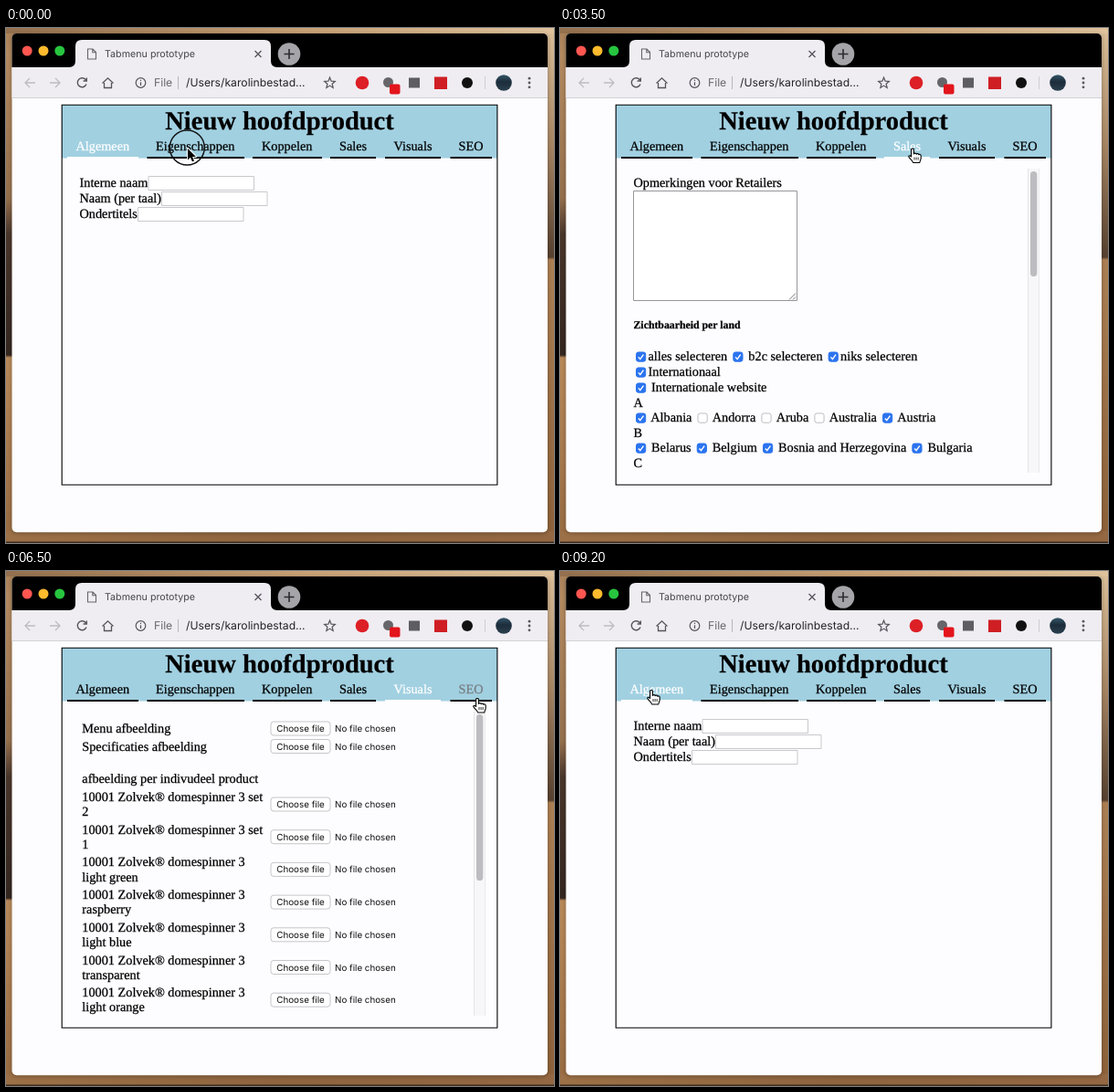
An HTML page with a canvas that plays this animation: 600 px wide and 564 px high, repeating every 9300 ms.

```html
<!DOCTYPE html>
<html lang="nl">
<head>
<meta charset="utf-8">
<title>Tabmenu prototype</title>
<style>
html, body { margin: 0; width: 100%; height: 100%; overflow: hidden; }
canvas { display: block; }
</style>
</head>
<body>
<canvas id="stage" width="600" height="564"></canvas>
<script>
const ctx = document.getElementById('stage').getContext('2d');
ctx.textRendering = 'geometricPrecision';

const LOOP = 9300, STEP = 100;
const SERIF = '"Liberation Serif", serif', SANS = 'Inter, sans-serif';
const BODY = `14.27px ${SERIF}`, SMALL = `9.8px ${SANS}`;
const PAPER = '#fdfcfe', CHROME = '#efedf2';

// label, text x, underline left, underline right
const TABS = [
  ['Algemeen', 76.5, 67, 145], ['Eigenschappen', 164, 154.5, 261],
  ['Koppelen', 280, 270, 346], ['Sales', 365, 355, 405],
  ['Visuals', 424.5, 415, 476], ['SEO', 495.5, 486.5, 532]
];
// time, active tab
const SWITCHES = [[0, 0], [200, 1], [2000, 2], [3200, 3], [5700, 4], [6900, 5], [8600, 0]];
// time, x, y
const POINTER = [
  [0, 199, 132], [1300, 199, 132], [1900, 305, 132.5], [2700, 305, 132.5],
  [3200, 386, 132], [3700, 386, 132], [4100, 432, 241], [5100, 432, 241],
  [5600, 445, 133], [6000, 445, 133], [6500, 516, 139.5], [6800, 510, 128.5],
  [7700, 510, 128.5], [8500, 100, 130.5], [9300, 100, 130.5]
];
// time, scroll offset
const SCROLL = [[0, 0], [3900, 0], [4800, 500], [5200, 606], [9300, 606]];

const BRAND = 'Zolvek®', DOME = 'Domespinner', JELLY = 'Jellymunse';
const DOME_SETS = ['set 2', 'set 1', 'light green', 'raspberry', 'light blue',
  'transparent', 'light orange', 'light brown', 'white'];
const JELLY_SETS = [9, 5, 4, 6, 8, 7].map(n => `set ${n}`);
const PRODUCTS = [
  ...DOME_SETS.slice(0, 5).map(s => [DOME, 3, s]),
  ...JELLY_SETS.map(s => [JELLY, 4, s]),
  ...DOME_SETS.slice(5).map(s => [DOME, 3, s])
];

// + checked, - unchecked, = checked without a space before the label
const COUNTRIES = [
  '=alles selecteren|+b2c selecteren|=niks selecteren', '=Internationaal',
  '+Internationale website',
  'A', '+Albania|-Andorra|-Aruba|-Australia|+Austria',
  'B', '+Belarus|+Belgium|+Bosnia and Herzegovina|+Bulgaria',
  'C', '-Canada|-Chile|-China|-Colombia|+Croatia', '+Cyprus|+Czech Republic',
  'D', '+Denmark', 'E', '-Egypt|+Estonia', 'F', '+Finland|+France',
  'G', '+Germany|+Greece', 'H', '-Hong Kong|+Hungary',
  'I', '-Iceland|-India|-Iran|+Ireland|-Israel|+Italy|-Ivory Coast',
  'J', '-Japan', 'L', '+Latvia|-Lebanon|+Lithuania|+Luxembourg',
  'M', '+Macedonia, Republic of|-Madagascar|-Malaysia|-Maldives',
  '+Malta|-Mauritius|-Mexico|+Moldova|-Montenegro', '-Morocco',
  'N', '+Netherlands|-New Caledonia|-New Zealand|+Norway',
  'P', '-Philippines|+Poland|+Portugal', 'R', '+Romania|-Russia',
  'S', '-Saint Martin|-Senegal|+Serbia|-Singapore|+Slovakia',
  '+Slovenia|-South Korea|+Spain|+Sweden|-Switzerland',
  'T', '-Taiwan|-Thailand|-Turkey', 'U', '+Ukraine|+United Kingdom',
  'V', '-Vietnam'
];

const ARROW = new Path2D('M0 0V12.5L2.9 9.8L4.9 14.3L7 13.4L5.1 9H9Z');
const HAND = new Path2D('M-1.4 9V1.2C-1.4 -.4 1.4 -.4 1.4 1.2V6C1.6 4.8 4 4.8 4.2 6.2' +
  'C4.8 5.2 6.6 5.4 6.8 6.8C7.6 6 9.2 6.6 9.2 8V10.5C9.2 12.5 8 13.5 7.8 15.5H.6' +
  'C.2 13.5 -3 11.5 -4.2 9C-4.4 7.6 -2.6 7.4 -1.4 9Z');

function rect(x, y, w, h, fill) {
  ctx.fillStyle = fill;
  ctx.fillRect(x, y, w, h);
}

function box(x, y, w, h, radius, fill, stroke, width = 1) {
  ctx.beginPath();
  ctx.roundRect(x, y, w, h, radius);
  if (fill) { ctx.fillStyle = fill; ctx.fill(); }
  if (stroke) { ctx.strokeStyle = stroke; ctx.lineWidth = width; ctx.stroke(); }
}

function disc(x, y, r, fill) {
  ctx.beginPath();
  ctx.arc(x, y, r, 0, 7);
  ctx.fillStyle = fill;
  ctx.fill();
}

function ring(x, y, r, color, width) {
  ctx.beginPath();
  ctx.arc(x, y, r, 0, 7);
  ctx.strokeStyle = color;
  ctx.lineWidth = width;
  ctx.stroke();
}

function line(path, color, width = 1.3) {
  ctx.strokeStyle = color;
  ctx.lineWidth = width;
  ctx.stroke(new Path2D(path));
}

function text(str, x, y, font = BODY, color = '#000', align = 'left') {
  ctx.font = font;
  ctx.fillStyle = ctx.strokeStyle = color;
  ctx.textAlign = align;
  ctx.fillText(str, x, y);
  // a hairline outline gives the serif its heavier smoothing
  if (font.includes(SERIF)) {
    ctx.lineWidth = .25;
    ctx.strokeText(str, x, y);
  }
}

function gradient(x0, y0, x1, y1, ...stops) {
  const g = ctx.createLinearGradient(x0, y0, x1, y1);
  stops.forEach(([at, color]) => g.addColorStop(at, color));
  return g;
}

function tween(keys, t) {
  const i = Math.max(1, keys.findIndex(k => k[0] > t));
  const a = keys[i - 1], b = keys[i];
  const p = (t - a[0]) / (b[0] - a[0]), e = p * p * (3 - 2 * p);
  return a.slice(1).map((v, n) => v + (b[n + 1] - v) * e);
}

function drawDesktop() {
  rect(0, 0, 600, 564, gradient(0, 0, 600, 0, [0, '#94704e'], [.55, '#c9a276'], [1, '#dfc39d']));
  rect(0, 6, 8, 558, gradient(0, 0, 0, 564, [0, '#a98159'], [.05, '#b58b60'], [.33, '#96704d'],
    [.4, '#4a362b'], [.635, '#33261f'], [.64, '#b98a5a'], [1, '#986b41']));
  rect(592, 6, 8, 558, gradient(0, 0, 0, 564, [0, '#dcc09a'], [.23, '#a78563'],
    [.445, '#57412f'], [.45, '#ad8054'], [1, '#8d6139']));
  rect(0, 551, 600, 13, gradient(0, 0, 600, 0, [0, '#9d7147'], [.5, '#8f653f'], [1, '#946842']));
  rect(0, 562.5, 600, 1.5, '#3d2a1c');
}

function drawToolbar() {
  const dark = '#55555a', pale = '#bdbcc1';
  line('M32 60H21M26 55L21 60L26 65', pale);
  line('M48 60H59M54 55L59 60L54 65', pale);
  line('M87.5 57A5 5 0 1 0 88 61.5M88.3 54.5V58H84.6', dark, 1.4);
  line('M105.5 60.5L111.5 54.8L117.5 60.5M107.5 60V65.5H115.5V60', dark);
  ring(147.5, 60, 5.3, dark, 1.2);
  line('M147.5 59.3V63M147.5 56.8V58', dark, 1.2);
  text('File', 162, 64.3, `12.2px ${SANS}`, '#68686d');
  rect(188, 53, 1, 14, '#b7b6bb');
  text('/Users/karolinbestad...', 197, 64.3, `12.2px ${SANS}`, '#242428');
  line('M354.5 54.2L356.1 58.2L360.3 58.5L357.1 61.2L358.1 65.4L354.5 63.1' +
    'L350.9 65.4L351.9 61.2L348.7 58.5L352.9 58.2Z', dark, 1.2);
  disc(390, 60, 7.3, '#dd1f26');
  disc(418.5, 59.5, 5.5, '#66666a');
  box(420, 61.5, 11.5, 11, 2, '#e3141c');
  rect(441, 54.5, 12, 11, '#5d5d62');
  rect(469, 53.5, 14, 13.5, '#cf1f24');
  disc(505, 60, 6, '#111');
  rect(524, 53, 1, 14, '#cfced3');
  disc(545, 60, 8.8, gradient(0, 51, 0, 69, [0, '#35586a'], [.45, '#1c2c3a'], [1, '#2b4150']));
  [55.2, 60, 64.8].forEach(y => disc(573, y, 1.4, dark));
}

function drawBrowser() {
  ctx.save();
  ctx.shadowColor = 'rgba(0,0,0,.3)';
  ctx.shadowBlur = 5;
  ctx.shadowOffsetY = 1;
  box(6.5, 6, 586.5, 546.3, 5, PAPER);
  ctx.restore();
  box(6.5, 6, 586.5, 37, [5, 5, 0, 0], '#000');
  ['#ff5650', '#fdbb2d', '#27c53f'].forEach((c, i) => disc(23.2 + i * 17.8, 25, 5.5, c));
  ctx.fillStyle = CHROME;
  ctx.fill(new Path2D('M69 43Q76 43 76 36V20Q76 13 83 13H283Q290 13 290 20V36Q290 43 297 43Z'));
  line('M89.5 23H95L98.5 26.5V34H89.5ZM94.8 23V26.8H98.5', '#66666b', 1.1);
  text('Tabmenu prototype', 108, 32.2, `10.7px ${SANS}`, '#46464b');
  line('M272.5 25L279.5 32M279.5 25L272.5 32', '#55555a');
  disc(310, 28.5, 12.3, '#a5a4a9');
  line('M304.5 28.5H315.5M310 23V34', '#2c2c30', 1.6);
  rect(6.5, 43, 586.5, 33, CHROME);
  rect(6.5, 76, 586.5, 1, '#d3d2d7');
  drawToolbar();
}

function drawHeader(active, hovered) {
  rect(61, 84, 477, 58.5, '#a1d0e1');
  text('Nieuw hoofdproduct', 299.5, 110.7, `bold 28.5px ${SERIF}`, '#000', 'center');
  TABS.forEach(([label, x, left, right], i) => {
    const on = i === active;
    text(label, x, 134, BODY, on ? '#fff' : i === hovered ? '#777d82' : '#000');
    rect(left, 141, right - left, 2, on ? '#fff' : '#000');
  });
  box(61.2, 84.3, 476.7, 415.9, 0, null, '#000', 1.1);
}

function field(x, y, w = 115.5) {
  box(x + .5, y + .5, w, 15, 0, '#fff', '#c9c9cd');
}

function button(label, x, mid, w) {
  box(x, mid - 7, w, 15, 3, '#fff', '#c6c6ca');
  text(label, x + w / 2, mid + 4, SMALL, '#111', 'center');
}

function checkbox(x, mid, checked) {
  box(x + .3, mid - 4.5, 10.2, 10.2, 2.3, checked ? '#2b74ef' : '#fff', checked ? '#2b74ef' : '#bdbdc2');
  if (checked) line(`M${x + 2.6} ${mid + .9}l2 2.2l3.6 -5`, '#fff', 1.4);
}

function scrollbar(y, h) {
  rect(512, 154, 13, 333, '#f7f6f8');
  rect(512, 154, 1, 333, '#e6e5e8');
  rect(524, 154, 1, 333, '#eae9ec');
  box(515, y, 7.3, h, 3.6, '#bdbcc0');
}

function drawGeneral() {
  [['Interne naam', 155.5], ['Naam (per taal)', 170], ['Ondertitels', 144]].forEach(([label, x], i) => {
    text(label, 80.5, 174.3 + i * 17);
    field(x, 162 + i * 17);
  });
}

function drawLinking() {
  text('*nog geen producten gekoppeld', 80.5, 174.3);
  field(267, 162);
  text('search products', 269.5, 173.8, `10.9px ${SANS}`, '#77777b');
  text('hoofdproduct', 138.3, 194);
  text('SKU', 223.3, 194);
  text('interne naam', 276, 194);
  PRODUCTS.forEach(([family, size, variant], i) => {
    const mid = 208.8 + i * 19.63, base = mid + 4.9;
    button('koppel', 83.5, mid, 44.5);
    text(family, 138.3, base);
    text(100001 + i, 223.3, base);
    text(`${BRAND} ${family.toLowerCase()} ${size} ${variant}`, 276, base);
  });
  scrollbar(157, 244);
}

function drawCountryRow(row, mid) {
  const base = mid + 4.7;
  if (row.length === 1) return text(row, 80.5, base);
  let x = 80.5;
  row.split('|').forEach(item => {
    const label = (item[0] === '=' ? '' : ' ') + item.slice(1);
    checkbox(x + 2.7, mid, item[0] !== '-');
    text(label, x + 16, base);
    x += 16 + ctx.measureText(label + ' ').width;
  });
}

function drawSales(scroll) {
  ctx.save();
  ctx.translate(0, -scroll);
  text('Opmerkingen voor Retailers', 80.5, 174.3);
  box(80.5, 178.5, 179, 120, 0, '#fff', '#97979b');
  line('M251 297.5L258 290.5M255 297.5L258 294.5', '#77777b', 1);
  text('Zichtbaarheid per land', 80.5, 329.3, `bold 11.8px ${SERIF}`);
  COUNTRIES.forEach((row, i) => drawCountryRow(row, i < 3 ? 359.5 + i * 17 : 410 + (i - 3) * 16.53));
  ctx.restore();
  scrollbar(157 + scroll * .35, 115);
}

function fileRow(mid) {
  button('Choose file', 290, mid, 65);
  text('No file chosen', 360, mid + 4, SMALL, '#111');
}

function drawVisuals() {
  ['Menu afbeelding', 'Specificaties afbeelding'].forEach((label, i) => {
    text(label, 83.3, 177 + i * 19.5);
    fileRow(172 + i * 19.5);
  });
  text('afbeelding per indivudeel product', 83.3, 232);
  DOME_SETS.slice(0, 7).forEach((variant, i) => {
    const mid = 255 + i * 35.7;
    const [, prefix, rest] = variant.match(/^(set )?(.*)$/);
    text(`10001 ${BRAND} ${DOME.toLowerCase()} 3 ${prefix || ''}`, 83.3, mid - 3);
    text(rest, 83.3, mid + 13.2);
    fileRow(mid);
  });
  scrollbar(157, 182);
}

function drawPanel(tab, scroll) {
  ctx.save();
  ctx.beginPath();
  ctx.rect(62, 154, 475, 333);
  ctx.clip();
  if (tab === 0) drawGeneral();
  if (tab === 2) drawLinking();
  if (tab === 3) drawSales(scroll);
  if (tab === 4) drawVisuals();
  ctx.restore();
}

function drawPointer(x, y, hand) {
  ctx.save();
  ctx.translate(x, y);
  ctx.lineJoin = 'round';
  ctx.lineWidth = hand ? 1.1 : 1.8;
  ctx.strokeStyle = hand ? '#000' : '#fff';
  ctx.fillStyle = hand ? '#fff' : '#000';
  const shape = hand ? HAND : ARROW;
  if (!hand) ctx.stroke(shape);
  ctx.fill(shape);
  if (hand) {
    ctx.stroke(shape);
    line('M2 9.5V12.5M4.1 9.5V12.5M6.2 9.5V12.5', '#000', .8);
  }
  ctx.restore();
}

function draw(t) {
  const tab = SWITCHES.filter(s => s[0] <= t).pop()[1];
  const [x, y] = tween(POINTER, t);
  const [scroll] = tween(SCROLL, t);
  const pressing = t < 200;
  const hovered = pressing || y < 118 || y > 143 ? -1 : TABS.findIndex(([, , l, r]) => x >= l && x <= r);
  drawDesktop();
  drawBrowser();
  drawHeader(tab, hovered);
  drawPanel(tab, scroll);
  if (pressing) ring(198.3, 131, 19, '#111', 1.5);
  drawPointer(x, y, hovered >= 0);
}

const start = performance.now();
function tick() {
  const t = (performance.now() - start) % LOOP;
  draw(Math.floor(t / STEP) * STEP);
  requestAnimationFrame(tick);
}
tick();
</script>
</body>
</html>
```
